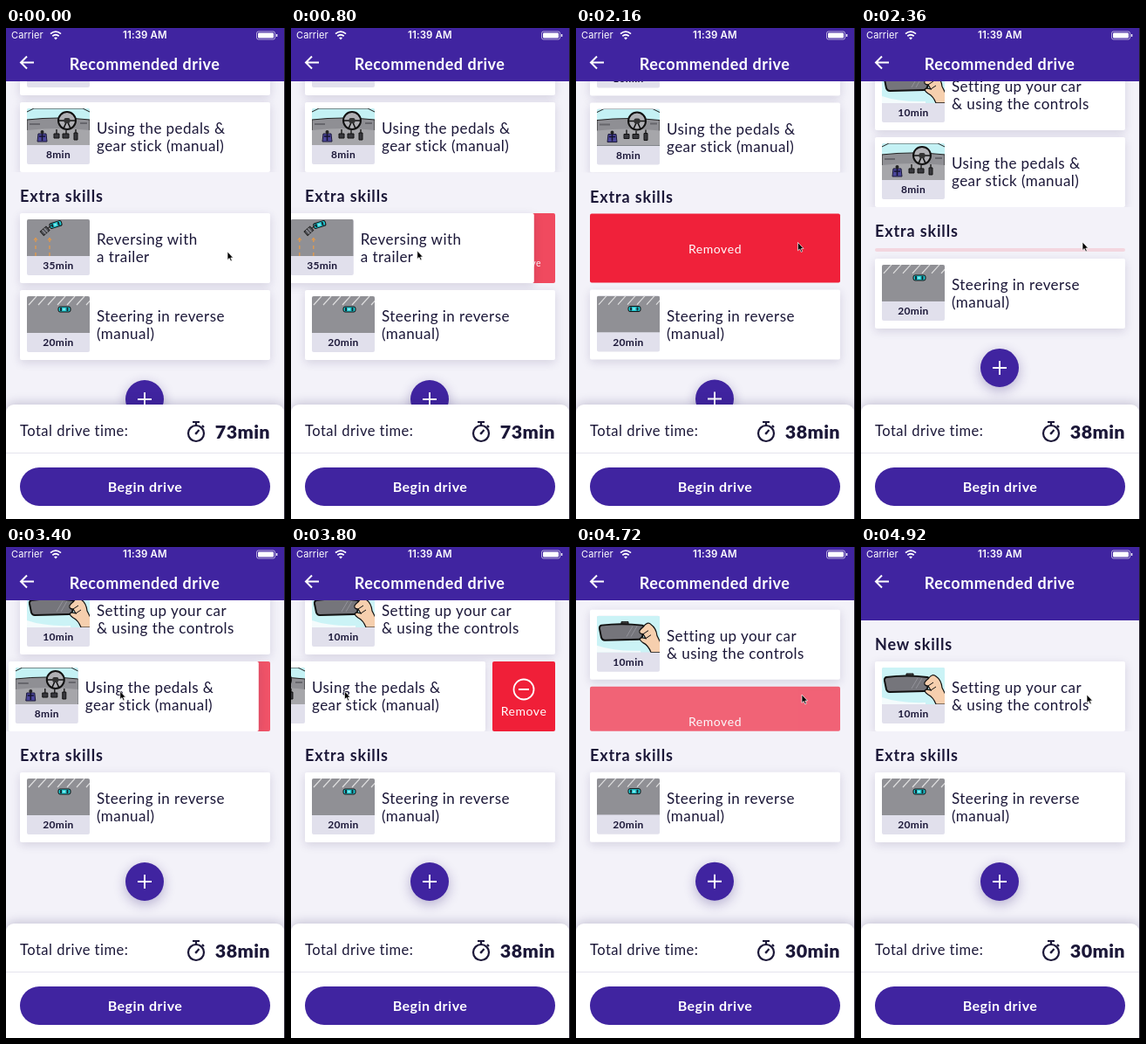
Recreate the animation shown at these times as an HTML page. Size 320x562 px, loop 4960 ms.

```html
<!DOCTYPE html>
<html lang="en">
<head>
<meta charset="utf-8">
<title>Recommended drive</title>
<style>
  :root { --purple: #4024a0; --ink: #1b1738; --paper: #f3f2f9; --red: #f01f38; }
  html, body { margin: 0; width: 100%; height: 100%; overflow: hidden; }
  body { position: relative; background: var(--paper); color: var(--ink); font: 17px/20px Lato, sans-serif; letter-spacing: .45px; }
  svg { display: block; }
  #stage { position: absolute; left: 0; top: 0; width: 320px; height: 562px; overflow: hidden; background: var(--paper); }
  #scroll { position: absolute; left: 0; top: 0; width: 320px; }
  .band { height: 84px; background: var(--purple); }
  h2 { margin: 0 16px; height: 47px; font: 700 18px/54px Lato, sans-serif; letter-spacing: .85px; }
  .list { padding: 0 17px 0 16px; }
  .list.cut { clip-path: inset(-30px 0 8px 0); margin-bottom: -8px; }
  .slot { position: relative; height: 88px; }
  .row { position: absolute; left: 0; right: 0; top: 0; height: calc(100% - 8px); }
  .card { position: absolute; left: 0; top: 0; width: 287px; height: 80px; border-radius: 2px; background: #fff;
    box-shadow: 0 3px 11px rgba(40, 30, 90, .15); display: flex; align-items: center; white-space: pre; }
  .thumb { width: 72px; height: 64px; margin: 0 8px 2px; border-radius: 2px; overflow: hidden; background: #e1e0ec; flex: none; }
  .thumb b { display: block; text-align: center; font-size: 12px; line-height: 22px; letter-spacing: .3px; }
  .bin { position: absolute; right: 0; top: 0; height: 100%; width: 72px; border-radius: 2px; overflow: hidden; background: var(--red); color: #fff; opacity: 0; }
  .bin svg { position: absolute; left: 50%; top: 18px; margin-left: -14px; }
  .bin span { position: absolute; left: 0; right: 0; text-align: center; font-size: 14px; letter-spacing: .55px; }
  #add { position: absolute; left: 137px; margin-top: 15px; width: 44px; height: 44px; border-radius: 50%;
    background: var(--purple); box-shadow: 0 4px 14px rgba(50, 30, 120, .32); }
  header { position: absolute; left: 0; top: 0; width: 320px; height: 61px; background: var(--purple); color: #fff; }
  header svg { position: absolute; left: 0; top: 0; }
  header * { position: absolute; white-space: nowrap; }
  h1 { margin: 0; left: 0; right: 2px; top: 31px; text-align: center; font: 700 18px/20px Lato, sans-serif; letter-spacing: .5px; }
  .sys { top: 1px; font: 11px/15px Inter, sans-serif; letter-spacing: .1px; }
  footer { position: absolute; left: 0; top: 431px; width: 319px; height: 131px; background: #fff;
    border-radius: 9px 9px 0 0; box-shadow: 0 -2px 12px rgba(40, 30, 90, .22); }
  footer p { position: absolute; margin: 0; left: 16px; top: 20px; font-size: 16.5px; letter-spacing: .5px; }
  .total { position: absolute; right: 16px; top: 18px; display: flex; align-items: center; gap: 10px;
    font-size: 21.5px; line-height: 24px; font-weight: 900; letter-spacing: .4px; }
  footer hr { position: absolute; margin: 0; border: 0; left: 0; right: 0; top: 55px; height: 1px; background: #e5e4ed; }
  .go { position: absolute; left: 16px; top: 72px; width: 287px; height: 44px; border-radius: 22px; background: var(--purple);
    color: #fff; text-align: center; font: 700 16px/44px Lato, sans-serif; letter-spacing: .5px; }
  .edge { position: absolute; left: 319px; top: 0; width: 1px; height: 562px; background: #25222f; }
  #cursor { position: absolute; left: 0; top: 0; overflow: visible; }
</style>
</head>
<body>
<div id="stage">
  <div id="scroll">
    <div class="band"></div>
    <h2>New skills</h2>
    <div class="list cut" id="fresh"></div>
    <h2>Extra skills</h2>
    <div class="list" id="extra"></div>
    <div id="add"><svg width="44" height="44" stroke="#fff" stroke-width="2"><path d="M14 22h16M22 14v16"/></svg></div>
  </div>

  <header>
    <svg width="320" height="62" fill="none" stroke="#fff">
      <path d="M32 39.5H17.5M24 32.5l-7 7 7 7" stroke-width="2"/>
      <path d="M51 6.6q6-5 12 0M53.3 9.2q3.7-3 7.4 0" stroke-width="1.8"/>
      <path d="M55 11.2q2-1.6 4 0l-2 2.2z" fill="#fff" stroke="none"/>
      <rect x="287.5" y="4" width="21" height="9" rx="2" stroke-opacity=".6"/>
      <rect x="289" y="5.5" width="18" height="6" rx="1" fill="#fff" stroke="none"/>
      <path d="M310.5 7v3" stroke-width="1.4"/>
    </svg>
    <span class="sys" style="left:6px">Carrier</span>
    <span class="sys" style="left:134px;font-weight:600;font-size:11.5px">11:39 AM</span>
    <h1>Recommended drive</h1>
  </header>

  <footer>
    <p>Total drive time:</p>
    <div class="total">
      <svg width="24" height="26" fill="none" stroke="#1b1738" stroke-width="2.2">
        <circle cx="12" cy="15" r="9"/>
        <path d="M8 2h8M12 2v4M19 6l2 2M12 15l3.5-4"/>
        <circle cx="12" cy="15" r="1" fill="#1b1738" stroke-width="1"/>
      </svg>
      <span id="total">73min</span>
    </div>
    <hr>
    <div class="go">Begin drive</div>
  </footer>

  <div class="edge"></div>
  <svg id="cursor" width="9" height="13"><path d="M0 0V9.4L2.2 7.5 3.8 11 5.3 10.3 3.8 7H6.6Z" stroke="#fff" stroke-width=".7"/></svg>
</div>

<script>
const LOOP = 4960, OPEN = 80, ROW = 88;
const $ = id => document.getElementById(id);

const car = (x, y, turn) => `<g transform="translate(${x} ${y}) rotate(${turn})">
  <rect x="-7" y="-3" width="14" height="6" rx="2" fill="#1fc6cf" stroke="#111"/>
  <path d="M-4-2v4M3.5-2v4" stroke="#152c35" stroke-width="2"/><path d="M-2 0h3" stroke="#7be9ec" stroke-width="2.500"/></g>`;

const hatch = Array.from({ length: 8 }, (_, i) => `M${i * 11 - 9} 10l9-10`).join('');
const road = '<rect width="72" height="42" fill="#909095"/>';

const art = {
  mirror: `<rect width="72" height="42" fill="#cbf3f6"/>
    <path d="M0 34q20 7 50 6v2H0z" fill="#f4fbfc"/>
    <path d="M28 11V7h8v4" fill="#444" stroke="#111"/>
    <path d="M5 11Q28 8 52 11q3 1 2 5l-2 8q-1 3-4 3L9 28q-3 0-4-3L3 15q-.500-3 2-4z" fill="#75757b" stroke="#111" stroke-width="2"/>
    <path d="M34 24l7-12M39 24l7-12" stroke="#93939a"/>
    <path d="M53 13q5-7 9-3 6 4 7 13l4 8v11H62q-3-8-9-11-6-4-2-6l5 1-3-5q-5 0-4-4 2-3 4-4z" fill="#f6cfae" stroke="#111" stroke-width="1.2"/>
    <path d="M53 21l6-4M56 26l6-4" stroke="#111" fill="none"/>`,
  pedals: `<rect width="72" height="42" fill="#c4f1f4"/>
    <path d="M0 4L8 0h56l8 4" fill="none" stroke="#222"/>
    <path d="M0 13Q36 9 72 13v29H0z" fill="#8f8f94" stroke="#222"/>
    <path d="M0 25q36-4 72 0v17H0z" fill="#a6a6aa"/>
    <path d="M3 18h12M61 17h8" stroke="#66666c" stroke-width="2"/>
    <circle cx="46" cy="14" r="10" fill="#b0b0b4" stroke="#111" stroke-width="2"/>
    <path d="M36 14h20M46 14l-4 9M46 14l4 9" stroke="#111" stroke-width="1.6"/>
    <rect x="42.500" y="11" width="7" height="6" rx="2" fill="#333"/>
    <path d="M34 24v5M45 25v4M56 24v5" stroke="#222" stroke-width="1.5"/>
    <path d="M31 29h6v5h-6zM41 29h7v5h-7zM54 28h4v8h-4z" fill="#39393e" stroke="#111"/>
    <path d="M13 29h9l1 9H12z" fill="#4b469a" stroke="#1a1838"/>
    <path d="M17.500 37v-9M14 32h7" stroke="#161430" stroke-width="1.6"/><circle cx="17.500" cy="27" r="2" fill="#222"/>`,
  trailer: `${road}${car(33, 6, -18)}
    <g transform="translate(21 13) rotate(-42)"><rect x="-5" y="-3" width="9" height="6" fill="#55565c" stroke="#222"/><path d="M4 0h6" stroke="#222"/><path d="M-2-3v6M1-3v6" stroke="#9a9aa0"/></g>
    <path d="M10 22v20M26 22v20" stroke="#e59a49" stroke-width="1.3" stroke-dasharray="4 4"/>
    <path d="M8 24l2-3 2 3M24 24l2-3 2 3" fill="none" stroke="#e59a49"/>`,
  reverse: `${road}<path d="${hatch}" stroke="#dededf" stroke-width="1.2"/>${car(43, 15, 0)}`
};

function addRow(list, pic, mins, text) {
  const slot = document.createElement('div');
  slot.className = 'slot';
  slot.innerHTML = `<div class="row">
    <div class="bin"><svg width="28" height="28" fill="none" stroke="#fff" stroke-width="1.8"><circle cx="14" cy="14" r="11.500"/><path d="M8 14h12"/></svg><span>Remove</span></div>
    <div class="card"><div class="thumb"><svg width="72" height="42">${art[pic]}</svg><b>${mins}min</b></div><div>${text}</div></div></div>`;
  $(list).append(slot);
  const [card, bin, icon, label] = ['.card', '.bin', '.bin svg', '.bin span'].map(s => slot.querySelector(s));
  return { slot, card, bin, icon, label };
}

addRow('fresh', 'mirror', 10, 'Setting up your car\n&amp; using the controls');
const pedals = addRow('fresh', 'pedals', 8, 'Using the pedals &amp;\ngear stick (manual)');
const trailer = addRow('extra', 'trailer', 35, 'Reversing with\na trailer');
addRow('extra', 'reverse', 20, 'Steering in reverse\n(manual)');

const clamp = (v, lo = 0, hi = 1) => Math.min(hi, Math.max(lo, v));
const mix = (a, b, u) => a + (b - a) * u;
const smooth = u => u * u * (3 - 2 * u);
const inOut = u => u < .5 ? 2 * u * u : 1 - 2 * (1 - u) ** 2;
const span = (t, from, ms = 300) => inOut(clamp((t - from) / ms));

// Steps are [start, end, value]; the value holds between steps.
function track(t, first, steps) {
  return steps.reduce((v, [a, b, to]) => mix(v, to, smooth(clamp((t - a) / (b - a)))), first);
}
const mouseX = t => track(t, 254, [[300, 1133, 86], [1200, 1660, 255], [2000, 2300, 254], [2950, 3713, 60], [3780, 4200, 259]]);
const mouseY = t => track(t, 256, [[300, 800, 255], [1200, 1660, 246], [2000, 2300, 245], [2900, 3330, 165], [3780, 4200, 169]]);

// Each swipe: where it is grabbed, when it is let go, when Remove is tapped.
const swipes = [
  { row: trailer, grab: 169, from: 600, release: 1140, tap: 1838 },
  { row: pedals, grab: 144, from: 2950, release: 3720, tap: 4300 }
];

function drawSwipe({ row, grab, from, release, tap }, t) {
  const pull = t < from ? 0 : t < release ? clamp(grab - mouseX(t), 0, OPEN) : OPEN;
  const out = span(t, tap), gone = span(t, tap + 300), shown = pull / OPEN;
  row.card.style.transform = `translateX(${-mix(pull, 320, out)}px)`;
  row.card.style.visibility = out < 1 ? 'visible' : 'hidden';
  row.bin.style.width = mix(72, 287, out) + 'px';
  row.bin.style.opacity = pull ? mix(.7, 1, shown) * (1 - gone) : 0;
  row.icon.style.opacity = clamp(1 - out * 6);
  row.icon.style.transform = row.label.style.transform = `scale(${mix(.65, 1, shown)})`;
  row.label.style.top = mix(47, 30, out) + 'px';
  row.label.textContent = t < tap ? 'Remove' : 'Removed';
  row.slot.style.height = ROW * (1 - gone) + 'px';
  return gone;
}

function draw(t) {
  const [a, b] = swipes.map(s => drawSwipe(s, t));
  $('scroll').style.transform = `translateY(${-134 + 46 * a + 88 * b}px)`;
  $('total').textContent = (b ? 30 : a ? 38 : 73) + 'min';
  $('cursor').style.transform = `translate(${mouseX(t)}px, ${mouseY(t)}px)`;
}

const start = performance.now();
function tick() {
  draw((performance.now() - start) % LOOP);
  requestAnimationFrame(tick);
}
tick();
</script>
</body>
</html>
```
